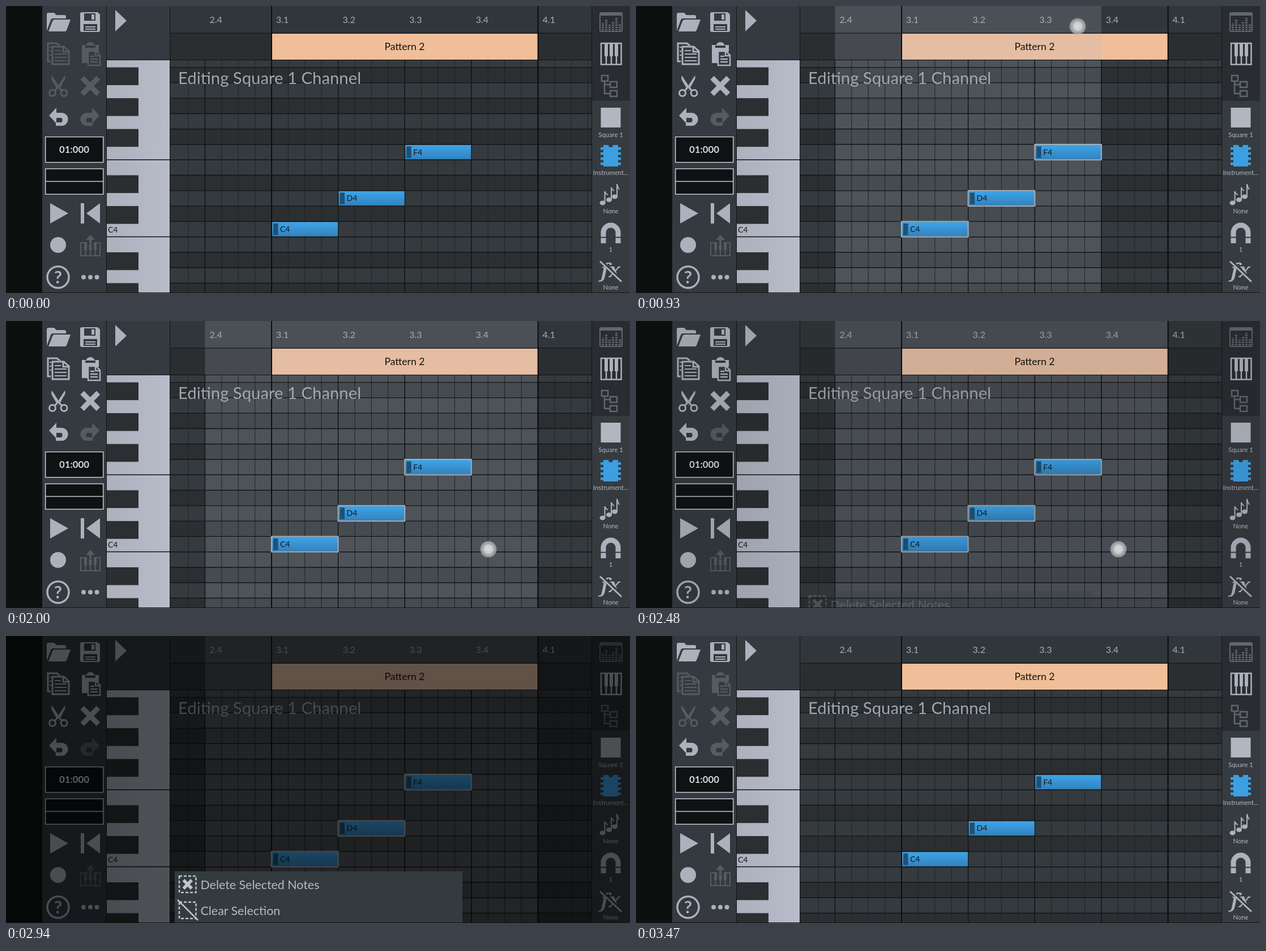
Animation, 1102 px wide and 508 px high, one loop 3670 ms. Source, as an HTML page:

```html
<!DOCTYPE html>
<html lang="en">
<head>
<meta charset="utf-8">
<title>Piano roll selection</title>
<style>
  html, body { margin: 0; width: 100%; height: 100%; overflow: hidden; background: #0e1010; }
  svg { display: block; width: 100vw; height: 100vh; font-family: Lato, "Open Sans", sans-serif; }
  .icon { color: #adb1bc; fill: currentColor; }
  .off { color: #565b61; }
  .dim { color: #62676f; }
  .line { fill: none; stroke: currentColor; stroke-width: 3; }
  .hole { fill: #343a3f; }
  .cut { fill: none; stroke: #343a3f; stroke-width: 2; }
  .label { fill: #b2b6bf; font-size: 11.3px; text-anchor: middle; }
  .bar { fill: #a9aeb6; font-size: 16px; }
  .item { fill: #b5bac2; font-size: 21.4px; }
  .key { fill: #15181a; font-size: 14px; }

  .edit, .sel, .ring, .dark, .menu, .touch { animation: 3670ms step-end infinite; }
  .edit { animation-name: edit; }
  .sel { animation-name: sel; }
  .dark { animation-name: dark; }
  .menu { animation-name: menu; }
  .touch { animation-name: touch; }
  .ring { fill: none; stroke: #a7b0b8; stroke-width: 2; }
  .r0 { animation-name: r0; }
  .r1 { animation-name: r1; }
  .r2 { animation-name: r2; }

  @keyframes edit {
    0%, 94.55% { color: #565b61; }
    16.07% { color: #adb1bc; }
  }
  @keyframes sel {
    0%, 92.64% { width: 0; }
    16.07% { width: 117.6px; }
    19.89% { width: 235.2px; }
    21.79% { width: 352.8px; }
    25.34% { width: 470.4px; }
    28.88% { width: 588px; }
  }
  @keyframes r0 { 0%, 92.64% { opacity: 0; } 19.89% { opacity: 1; } }
  @keyframes r1 { 0%, 92.64% { opacity: 0; } 21.79% { opacity: 1; } }
  @keyframes r2 { 0%, 92.64% { opacity: 0; } 25.34% { opacity: 1; } }
  @keyframes dark {
    0%, 94.55% { opacity: 0; }
    67.57% { opacity: .08; }
    71.11% { opacity: .36; }
    73.02% { opacity: .48; }
    76.56% { opacity: .56; }
    80.1% { opacity: .57; }
    92.64% { opacity: .28; }
  }
  @keyframes menu {
    0%, 94.55% { opacity: 0; transform: translateY(64px); }
    67.57% { opacity: .25; transform: translateY(62px); }
    71.11% { opacity: .85; transform: translateY(10px); }
    73.02% { opacity: 1; transform: translateY(1px); }
    76.56% { opacity: 1; transform: none; }
    92.64% { opacity: .5; transform: translateY(24px); }
  }
  @keyframes touch {
    0% { opacity: 0; transform: translate(405px, 36px); }
    16.07% { opacity: 1; transform: translate(405px, 36px); }
    17.98% { opacity: 1; transform: translate(442px, 36px); }
    19.89% { opacity: 1; transform: translate(519px, 36px); }
    21.79% { opacity: 1; transform: translate(622px, 36px); }
    25.34% { opacity: 1; transform: translate(780px, 36px); }
    28.88% { opacity: 1; transform: translate(868px, 36px); }
    32.42% { opacity: .75; transform: translate(868px, 36px); }
    34.33% { opacity: .5; transform: translate(868px, 36px); }
    36.23% { opacity: .2; transform: translate(868px, 36px); }
    38.14% { opacity: 0; transform: translate(852px, 404px); }
    52.58% { opacity: 1; transform: translate(852px, 404px); }
    76.56% { opacity: .5; transform: translate(852px, 404px); }
    80.1%, 100% { opacity: 0; transform: translate(852px, 404px); }
  }
</style>
</head>
<body>
<svg viewBox="0 0 1102 508" preserveAspectRatio="none">
  <defs>
    <linearGradient id="note" x2="0" y2="1">
      <stop stop-color="#3ea4e8"/><stop offset="1" stop-color="#3282bd"/>
    </linearGradient>
    <linearGradient id="ivory">
      <stop stop-color="#adb1be"/><stop offset="1" stop-color="#b8bcca"/>
    </linearGradient>
    <radialGradient id="dot">
      <stop stop-color="#e6e6e6" stop-opacity=".92"/>
      <stop offset=".45" stop-color="#dcdcdc" stop-opacity=".9"/>
      <stop offset=".62" stop-color="#c4c6c8" stop-opacity=".78"/>
      <stop offset=".86" stop-color="#b4b7ba" stop-opacity=".72"/>
      <stop offset="1" stop-color="#888" stop-opacity="0"/>
    </radialGradient>
  </defs>

  <!-- panels -->
  <rect width="1102" height="508" fill="#0e1010"/>
  <rect x="64" width="226" height="508" fill="#343a3f"/>
  <rect x="290" width="745" height="48" fill="#31363a"/>
  <rect x="290" y="48" width="745" height="48" fill="#2a2e31"/>
  <rect x="290" y="96" width="745" height="412" fill="#343a3d"/>
  <rect x="1035" width="67" height="168" fill="#292d31"/>
  <rect x="1035" y="168" width="67" height="340" fill="#363b40"/>
  <g id="rows" fill="#2b2f31"></g>
  <rect x="470" y="49" width="469" height="46" fill="#f0be98"/>
  <rect class="sel" x="351.4" width="0" height="508" fill="#b4b9cd" fill-opacity=".2"/>

  <!-- grid -->
  <path id="thin" stroke="#202427" fill="none"/>
  <path id="beats" stroke="#121517" stroke-width="1.4" fill="none"/>
  <path d="M469 0V508M939.6 0V508" stroke="#0c0e0f" stroke-width="2"/>
  <path d="M290 48H1035M178 95.5H1035" stroke="#0f1213" stroke-width="1.2"/>
  <g id="bars" class="bar"></g>
  <text x="704" y="78" font-size="17.6" fill="#15130f" text-anchor="middle">Pattern 2</text>

  <!-- keyboard -->
  <rect x="178" y="96" width="112" height="412" fill="url(#ivory)"/>
  <g id="keys" fill="#2b2f31"></g>
  <path d="M178 272.2H290M178 408.6H290" stroke="#101213" stroke-width="1.5"/>
  <path d="M177.5 0V508M289.5 0V508M1034.5 0V508" stroke="#121517"/>
  <text class="key" x="180" y="400.500">C4</text>

  <g id="notes"></g>
  <text x="304" y="138" font-size="29.300" fill="#a2a7ae">Editing Square 1 Channel</text>

  <!-- left toolbar -->
  <g class="icon">
    <path d="M72 44V15q0-3 3-3h10l4 4h14q3 0 3 3v3H83q-3 0-4 3zM75 45l7-18q1-3 4-3h28l-7 19q-1 2-3 2z"/>
    <path d="M131 14q0-3 3-3h28l4 4v28q0 3-3 3h-29q-3 0-3-3z"/>
    <path class="hole" d="M138 13h20v13h-20zM137 32h24v12h-24z"/>
    <path d="M151 15h5v9h-5zM140 36h18v2h-18zM140 40h18v2h-18z"/>
    <path d="M193 7L213 26L193 45z"/>
    <path d="M76 194L89 180V189H98A11.500 11.500 0 0 1 98 212H88V206H98A5.500 5.500 0 0 0 98 198H89V208z"/>
    <path class="off" fill="currentColor" d="M165 194L152 180V189H143A11.500 11.500 0 0 0 143 212H153V206H143A5.500 5.500 0 0 1 143 198H152V208z"/>
    <path d="M78 349L110 367L78 385zM132 349h6v36h-6zM166 349V385L142 367z"/>
    <circle cx="92" cy="423" r="14"/>
    <circle class="line" cx="92" cy="480" r="19" style="stroke-width:3.500"/>
    <text x="92" y="491" font-size="31" font-weight="700" text-anchor="middle">?</text>
    <circle cx="137" cy="480" r="4"/><circle cx="149" cy="480" r="4"/><circle cx="160.500" cy="480" r="4"/>
  </g>
  <g class="icon off">
    <path d="M149 405L157 414H151V421H147V414H141z"/>
    <path class="line" style="stroke-width:2" d="M143 419H132V442H166V419H155M140.500 430V442M149 430V442M157.500 430V442"/>
    <path d="M138 419h5v13h-5zM146.500 422h5v10h-5zM155 419h5v13h-5z"/>
  </g>
  <g class="edit" fill="currentColor">
    <path class="line" d="M80 98H74V66H90L97 72"/>
    <path class="hole" d="M79 70h34v36H79z"/>
    <path class="line" d="M82 72H102L111 80V103H82zM101 72V81H111"/>
    <path class="line" style="stroke-width:2" d="M77 73H80M77 80H80M77 87H80M86 79H97M86 85H107M86 91H107M86 97H107"/>
    <path d="M134 69h8q1-5 7-5t7 5h8v12h-18v20h-12z"/>
    <path class="hole" d="M140 70h18v4h-18z"/>
    <path class="line" style="stroke-width:2.500" d="M145 80H159L166 87V105H145zM158 80V88H166M149 89H156M149 94H162M149 99H162"/>
    <path d="M81 123L96 146L92 150L82 133Q79 128 81 123zM104 123L89 146L93 150L102 133Q106 128 104 123z"/>
    <circle class="line" cx="82" cy="154" r="5.500"/><circle class="line" cx="102.500" cy="154" r="5.500"/>
    <path class="line" d="M86 150L92 143L99 150"/>
    <path class="line" style="stroke-width:9" d="M134.500 127L163 156M163 127L134.500 156"/>
  </g>
  <g fill="#0f1112" stroke="#c6cad1" stroke-width="1.500">
    <rect x="69.700" y="231.700" width="102" height="45"/>
    <rect x="69.700" y="288.200" width="102" height="45"/>
    <path d="M70 310.500H172"/>
  </g>
  <text x="120.500" y="260" font-size="16.800" font-weight="700" fill="#d3d7dd" text-anchor="middle">01:000</text>

  <!-- right sidebar -->
  <g class="icon dim">
    <rect class="line" style="stroke-width:2" x="1049" y="12" width="39" height="33" rx="2"/>
    <path d="M1049 12h39v5h-39z"/>
    <path class="line" style="stroke-width:4" stroke-dasharray="2.500 1.500" d="M1054 43V30M1060 43V24M1066 43V33M1072 43V27M1078 43V21M1084 43V31"/>
    <path class="line" style="stroke-width:2.500" d="M1052 123h11v10h-11zM1067 134h12v10h-12zM1067 150h12v10h-12zM1057 133V155H1067M1057 139H1067"/>
  </g>
  <g class="icon">
    <path class="line" style="stroke-width:2.500" d="M1051 66H1086.500V103.500H1051zM1060 86V103M1069 86V103M1078 86V103"/>
    <path d="M1057 66h6v23h-6zM1066 66h6v23h-6zM1075 66h6v23h-6z"/>
    <rect x="1050.500" y="180" width="35" height="35" fill="#b2b6c0"/>
    <g fill="#3c9fe2">
      <path d="M1055 246H1064A4 4 0 0 0 1072 246H1081V284H1055z"/>
      <path d="M1052.500 250V282M1083.500 250V282" stroke="#3c9fe2" stroke-width="5" stroke-dasharray="4.500 4.500"/>
    </g>
    <path class="line" style="stroke-width:2" d="M1057.500 348V328Q1059 333 1063 334M1069 342V321Q1071 326 1074 327M1079 337V315Q1080 321 1083 325"/>
    <ellipse cx="1053.500" cy="348.500" rx="5" ry="4"/><ellipse cx="1065" cy="343" rx="5" ry="4"/><ellipse cx="1075" cy="337.500" rx="5" ry="4"/>
    <path class="line" style="stroke-width:9" d="M1055 420V401A13 13 0 0 1 1081 401V420"/>
    <path class="cut" d="M1049 409.500H1061M1075 409.500H1087"/>
    <text x="1068" y="480" font-family="Noto Serif, Liberation Serif, serif" font-size="34" font-style="italic" font-weight="700" text-anchor="middle">fx</text>
    <path class="cut" style="stroke-width:6" d="M1050 451L1088 487"/>
    <path class="line" d="M1049 452L1087 488"/>
  </g>
  <g id="labels" class="label"></g>

  <rect class="dark" width="1102" height="508" opacity="0"/>

  <!-- popup -->
  <g class="menu" opacity="0">
    <rect x="298" y="416.500" width="508" height="140" fill="#343b3f"/>
    <g class="icon" style="color:#c0c5cc">
      <path class="line" style="stroke-width:2.500" stroke-dasharray="5 3" d="M306 425H335.500V454H306zM306 471H335.500V500H306z"/>
      <path class="line" style="stroke-width:5.500" d="M313.500 432L328 447M328 432L313.500 447"/>
      <path class="line" style="stroke-width:2.500" d="M303 467L339 503"/>
    </g>
    <text class="item" x="343.500" y="448">Delete Selected Notes</text>
    <text class="item" x="343.500" y="494">Clear Selection</text>
  </g>

  <circle class="touch" r="15.500" fill="url(#dot)" opacity="0"/>
  <rect y="507" width="1102" height="1" fill="#1a1013"/>
</svg>
<script>
  const BEAT = 117.6, X0 = 351.4, ROW = 27.28, Y0 = 108.6;
  const put = (id, html) => document.getElementById(id).innerHTML = html;
  const range = (n, f) => Array.from({ length: n }, (_, i) => f(i));
  const rowY = i => Y0 + ROW * i;

  const sharps = [0, 2, 4, 7, 9, 12, 14];
  put('rows', sharps.map(i => `<rect x="290" y="${rowY(i)}" width="745" height="${ROW}"/>`).join(''));
  put('keys', sharps.map(i => `<rect x="178" y="${rowY(i)}" width="56" height="31.5"/>`).join(''));

  const thin = range(25, i => `M${X0 + (i - 1) * BEAT / 4} 96V508`);
  const beats = range(6, i => `M${X0 + i * BEAT} 96V508`);
  const rows = range(15, i => `M290 ${rowY(i)}H1035`);
  document.getElementById('thin').setAttribute('d', thin.join(''));
  document.getElementById('beats').setAttribute('d', beats.concat(rows).join(''));

  put('bars', ['2.4', '3.1', '3.2', '3.3', '3.4', '4.1']
    .map((s, i) => `<text x="${X0 + 8 + i * BEAT}" y="29.5">${s}</text>`).join(''));

  put('labels', ['Square 1', 'Instrument...', 'None', '1', 'None']
    .map((s, i) => `<text x="1068" y="${231.5 + i * 67.7}">${s}</text>`).join(''));

  put('notes', [['C4', 10], ['D4', 8], ['F4', 5]].map(([name, row], i) => {
    const x = X0 + (i + 1) * BEAT, y = rowY(row);
    return `<rect x="${x + 1}" y="${y + 1}" width="${BEAT - 1.5}" height="${ROW - 2}" fill="url(#note)"/>
      <rect x="${x + 3}" y="${y + 3.5}" width="8.5" height="20.5" fill="#1f5177"/>
      <text class="key" x="${x + 15}" y="${y + 18.5}">${name}</text>
      <rect class="ring r${i}" x="${x}" y="${y}" width="${BEAT}" height="${ROW}" opacity="0"/>`;
  }).join(''));
</script>
</body>
</html>
```
